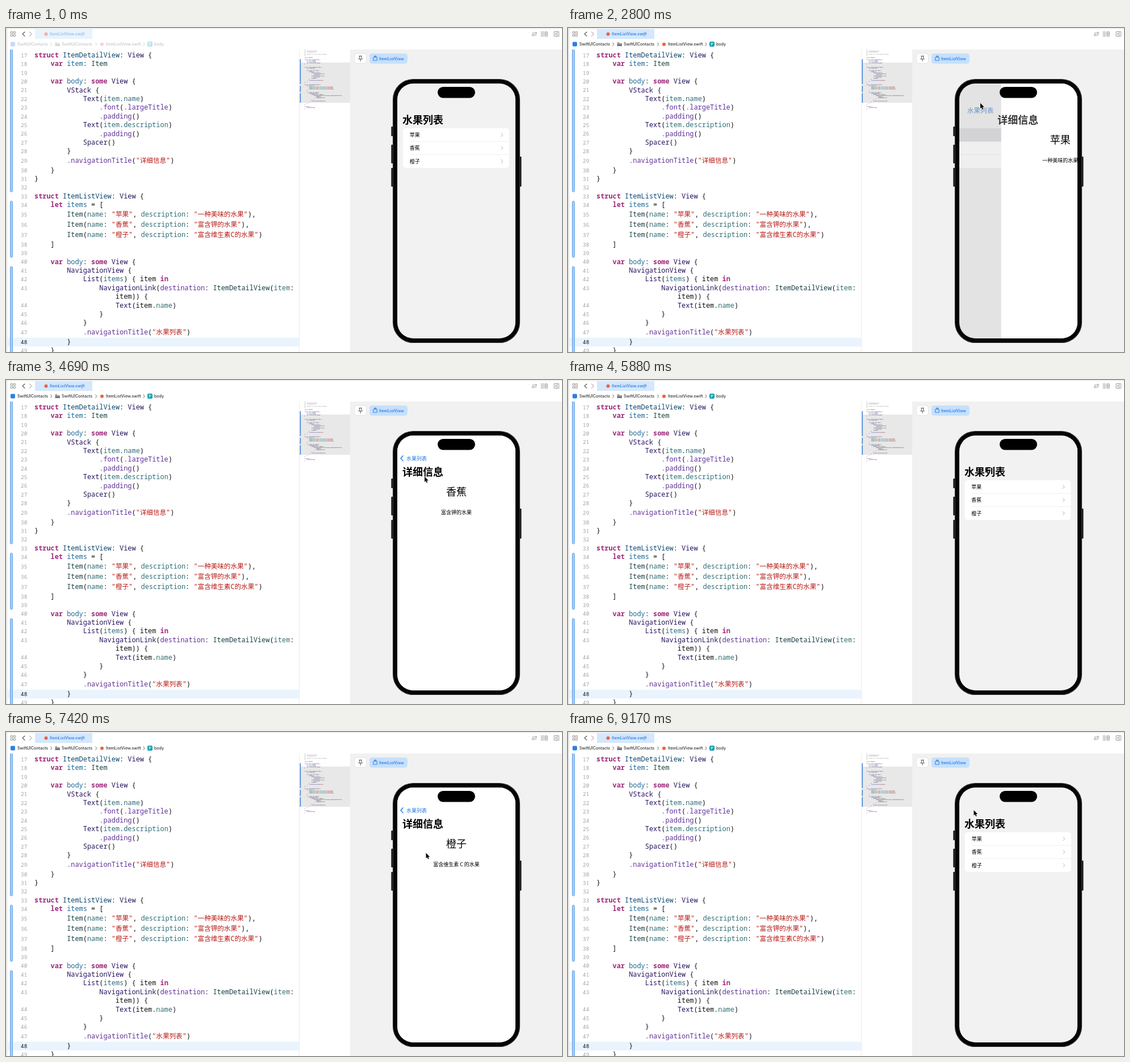
An HTML page for the animation above (9.24 s loop, 979 px wide and 572 px high).

```html
<!DOCTYPE html>
<html lang="zh-CN">
<head>
<meta charset="utf-8">
<style>
html, body { margin: 0; width: 100%; height: 100%; overflow: hidden; background: #fff; }
svg { display: block; }
text { white-space: pre; }
.ui { font-family: Inter, "Open Sans", sans-serif; font-weight: 500; }
.cn { font-family: "Noto Sans CJK SC", "Noto Sans CJK", sans-serif; }
.code { font: 500 11.92px "Noto Sans Mono", "DejaVu Sans Mono", monospace; }
.code .han { font: 500 11.57px "Noto Sans CJK SC", "Noto Sans CJK", sans-serif; }
.num { font: 400 9.4px "Noto Sans Mono", "DejaVu Sans Mono", monospace; text-anchor: end; }
.ln { fill: none; stroke-linecap: round; stroke-linejoin: round; }
</style>
</head>
<body>
<svg id="stage" width="979" height="572" viewBox="0 0 979 572">
  <defs><clipPath id="screen"><rect x="689" y="98" width="208" height="450" rx="28"/></clipPath></defs>
  <rect width="979" height="572" fill="#fff"/>
  <rect width="979" height="1.5" fill="#ececec"/>
  <rect width="2.2" height="572" fill="#e6e6e6"/>

  <g class="ln" stroke="#858585" stroke-width=".8">
    <path d="M8.5 6.5h3v3h-3zM13.5 6.5h3v3h-3zM8.5 11.5h3v3h-3zM13.5 11.5h3v3h-3z"/>
    <path d="M33 7l-4 3.7 4 3.7" stroke="#444" stroke-width="1.1"/>
    <path d="M41.5 7l4 3.7-4 3.7" stroke="#b0b0b0" stroke-width="1.1"/>
    <path d="M927 8.8h7.5m-2-2 2 2-2 2M934 12.4h-7.5m2-2-2 2 2 2"/>
    <path d="M942 7h5M942 9.4h5M942 11.8h5M942 14.2h5M949.5 6.8h3.6v7.6h-3.6zM949.5 9.3h3.6M949.5 11.8h3.6"/>
    <path d="M965.5 6.5h8v8h-8zM970.5 6.5v8M967 10.5h2M968 9.5v2"/>
  </g>

  <g id="tab">
    <rect x="51" y="2" width="101" height="17.3" fill="#d3e8fd"/>
    <circle cx="70.5" cy="10.8" r="3" fill="#f0603c"/>
    <text class="ui" x="77" y="13.3" font-size="7.1" font-style="italic" fill="#2478dc">ItemListView.swift</text>
  </g>
  <g id="crumbs" class="ui" font-size="7" fill="#303030">
    <rect x="8" y="24.5" width="8" height="8" rx="1.8" fill="#2f7fe6"/>
    <text x="20" y="31.2">SwiftUIContacts</text>
    <path d="M86.5 25.5h3l1 1.2h4.5v5.3h-8.5z" fill="#777"/>
    <path d="M86.5 27.7h8.5" stroke="#fff" stroke-width=".6"/>
    <text x="98" y="31.2">SwiftUIContacts</text>
    <circle cx="169" cy="28.8" r="3" fill="#f0603c"/>
    <text x="176" y="31.2" font-size="7.1">ItemListView.swift</text>
    <rect x="249" y="24" width="9" height="9" rx="2" fill="#1aa3b5"/>
    <text x="251.4" y="31" font-size="6.6" fill="#fff">P</text>
    <text x="261" y="31.2">body</text>
    <path class="ln" d="M78.7 26l2 2.7-2 2.7M157.7 26l2 2.7-2 2.7M242 26l2 2.7-2 2.7" stroke="#555" stroke-width=".9"/>
  </g>

  <rect x="2.2" y="546.8" width="514" height="15.4" fill="#e9f4fe"/>
  <g fill="#a3cbf6" stroke="#66a5e8">
    <path d="M7.5 38v249.5a2 2 0 0 0 4 0v-249.5"/>
    <rect x="7.5" y="305.5" width="4" height="99.5" rx="2"/>
    <path d="M7.5 572v-149a2 2 0 0 1 4 0v149"/>
  </g>
  <g id="code"></g>

  <path d="M516.5 38v534" stroke="#ececec"/>
  <rect x="518" y="61" width="88" height="71" fill="#e8e8e8"/>
  <g id="map"></g>
  <path d="M518.3 55v44M518.3 102v11M518.3 115v17" stroke="#3b7fd4" stroke-width="1.5"/>

  <rect x="606" y="38" width="373" height="534" fill="#f1f1f1"/>
  <rect x="613.5" y="45" width="21" height="17.5" rx="4" fill="#fff" stroke="#dedede" stroke-width=".8"/>
  <path class="ln" d="M621.8 49.5h4.6M622.5 49.5v3.3l-1.7 2h6.6l-1.7-2v-3.3M624.1 55v3.6" stroke="#444" stroke-width=".9"/>
  <rect x="640" y="45" width="67" height="18" rx="4.5" fill="#c6e0fc"/>
  <path class="ln" d="M647 52h6.4v5.2h-6.4zM648 50.5h4.4M649 49.2h2.4" stroke="#2478dc" stroke-width=".9"/>
  <text class="ui" x="657" y="56.6" font-size="7.1" fill="#2478dc">ItemListView</text>

  <g fill="#1a1a1a">
    <rect x="678.3" y="174" width="3.5" height="17" rx="1"/>
    <rect x="678.3" y="206" width="3.5" height="33" rx="1"/>
    <rect x="678.3" y="247" width="3.5" height="33" rx="1"/>
    <rect x="904" y="227" width="3.5" height="53" rx="1"/>
    <rect x="681.5" y="90.5" width="223" height="465" rx="36" fill="#050505" stroke="#343434" stroke-width="1.2"/>
  </g>

  <g clip-path="url(#screen)">
    <rect x="689" y="98" width="208" height="450" fill="#f2f2f2"/>
    <g id="list">
      <rect x="699" y="177" width="187" height="70" rx="5" fill="#fff"/>
      <g id="rows"></g>
    </g>
    <rect id="dim" x="689" y="98" width="208" height="450"/>
    <g id="detail">
      <rect x="689" y="98" width="208" height="450" fill="#fff"/>
      <g class="cn" text-anchor="middle">
        <text id="name" x="793" y="203.8" font-size="18"></text>
        <text id="desc" x="793" y="237" font-size="9"></text>
      </g>
    </g>
    <path id="back" class="ln" d="M699 133.7l-4 4.6 4 4.6" stroke="#1f76e4" stroke-width="1.4"/>
    <text id="blue" class="cn" fill="#1f76e4">水果列表</text>
    <text id="bold" class="cn" font-weight="700">水果列表</text>
    <text id="title" class="cn" y="168.8" font-size="18" font-weight="700">详细信息</text>
    <rect x="760" y="104" width="66" height="19.5" rx="9.75"/>
  </g>

  <path id="cursor" d="M0 0V9.6L2.2 7.6 3.6 10.9 5.2 10.2 3.8 7.1H6.8Z" stroke="#fff" stroke-width=".8" paint-order="stroke"/>
</svg>

<script>
const NS = 'http://www.w3.org/2000/svg';
const $ = id => document.getElementById(id);

function add(parent, tag, attrs, text) {
  const el = document.createElementNS(NS, tag);
  set(el, attrs);
  if (text !== undefined) el.textContent = text;
  parent.appendChild(el);
  return el;
}
function set(el, attrs) {
  for (const k in attrs) el.setAttribute(k, attrs[k]);
}

// Code: k keyword, d declared type, v declared name, c framework type,
// t project type, m member, p property, s string, r remark
const COLORS = { k: '#a02a7c', d: '#0c4870', c: '#29145e', v: '#1a6894', t: '#1a4147', m: '#60329a', p: '#326f77', s: '#b81a15', r: '#7d8790' };
const CODE = `k[struct] d[ItemDetailView]: c[View] {
    k[var] v[item]: t[Item]

    k[var] v[body]: k[some] c[View] {
        c[VStack] {
            c[Text](p[item].p[name])
                m[.font](m[.largeTitle])
                m[.padding]()
            c[Text](p[item].p[description])
                m[.padding]()
            c[Spacer]()
        }
        m[.navigationTitle](s["详细信息"])
    }
}

k[struct] d[ItemListView]: c[View] {
    k[let] v[items] = [
        t[Item](p[name]: s["苹果"], p[description]: s["一种美味的水果"]),
        t[Item](p[name]: s["香蕉"], p[description]: s["富含钾的水果"]),
        t[Item](p[name]: s["橙子"], p[description]: s["富含维生素C的水果"])
    ]

    k[var] v[body]: k[some] c[View] {
        c[NavigationView] {
            c[List](p[items]) { item k[in]
                c[NavigationLink](m[destination]: t[ItemDetailView](p[item]:
                    item)) {
                    c[Text](item.p[name])
                }
            }
            m[.navigationTitle](s["水果列表"])
        }
    }`.split('\n');
const HEAD = `r[//]
r[//  ItemListView.swift]
r[//  SwiftUIContacts]
r[//]
r[//  Created on a quiet sunny afternoon]
r[//]

k[import] c[SwiftUI]

k[struct] d[Item]: c[Identifiable] {
    k[let] v[id] = c[UUID]()
    k[let] v[name]: c[String]
    k[let] v[description]: c[String]
}

`.split('\n');
const TAIL = ['}', '', 'k[#Preview] {', '    t[ItemListView]()', '}'];

const isHan = s => /[\u4e00-\u9fff]/.test(s);

function tokens(line) {
  const out = [], re = /([kdvctmpsr])\[([^\]]*)\]/g;
  let at = 0, m;
  while ((m = re.exec(line))) {
    if (m.index > at) out.push([line.slice(at, m.index), '#111']);
    out.push([m[2], COLORS[m[1]], m[1]]);
    at = re.lastIndex;
  }
  if (at < line.length) out.push([line.slice(at), '#111']);
  return out;
}

function drawCode() {
  let top = 40.3, no = 17;
  for (const line of CODE) {
    const h = isHan(line) ? 18 : 15.4, mid = top + h / 2;
    const wrapped = /^ +item\)\)/.test(line);
    if (!wrapped) {
      add($('code'), 'text', { class: 'num', x: 37.3, y: mid + 3.7, fill: no === 48 ? '#111' : '#a3a3a3' }, no);
      no++;
    }
    const row = add($('code'), 'text', { class: 'code', x: 50, y: mid + 4 });
    for (const [str, fill, kind] of tokens(line))
      for (const part of str.match(/[\u4e00-\u9fff]+|[^\u4e00-\u9fff]+/g))
        add(row, 'tspan', { fill, class: isHan(part) ? 'han' : '', ...(kind === 'k' && { 'font-weight': 600 }) }, part);
    top += h;
  }
}

function drawMap() {
  [...HEAD, ...CODE, ...TAIL].forEach((line, i) => {
    let col = 0;
    for (const [str, fill] of tokens(line)) {
      for (const w of str.matchAll(/\S+/g))
        add($('map'), 'rect', { x: 525.5 + (col + w.index) * 1.03, y: 38.2 + i * 1.92, width: w[0].length * 1.03, height: 1.1, fill, opacity: .42 });
      col += str.length;
    }
  });
}

const FRUIT = [['苹果', '一种美味的水果'], ['香蕉', '富含钾的水果'], ['橙子', '富含维生素C的水果']];
const CARD = ['M699 200.4V182a5 5 0 0 1 5-5H881a5 5 0 0 1 5 5V200.4Z', 'M699 200.4H886V223.7H699Z', 'M699 223.7H886V242a5 5 0 0 1-5 5H704a5 5 0 0 1-5-5Z'];
const marks = FRUIT.map(([name], i) => {
  const y = 188.7 + i * 23.3, g = $('rows');
  const mark = add(g, 'path', { d: CARD[i], fill: '#d1d1d6', opacity: 0 });
  if (i) add(g, 'path', { d: `M711 ${y - 11.7}H886`, stroke: '#e4e4e4', 'stroke-width': .6 });
  add(g, 'text', { class: 'cn', x: 710.8, y: y + 3.4, 'font-size': 9 }, name);
  add(g, 'path', { class: 'ln', d: `M872 ${y - 2.8}l2.9 2.8-2.9 2.8`, stroke: '#b0b0b5', 'stroke-width': 1 });
  return mark;
});

function showFruit(i) {
  $('name').textContent = FRUIT[i][0];
  const [a, b] = FRUIT[i][1].split('C'), desc = $('desc');
  desc.textContent = a;
  if (b) {
    add(desc, 'tspan', { dx: 1.8 }, 'C');
    add(desc, 'tspan', { dx: 1.8 }, b);
  }
}

// Start of each push and pop
const VISITS = [[1122, 2722], [3990, 5460], [6580, 8185]];
// Pointer: time, x, y
const PATH = [
  [70, 742, 206], [560, 771.5, 188], [1600, 771.5, 188], [1960, 736, 147], [2170, 736, 147], [2380, 726, 132.5],
  [3200, 726, 132.5], [3710, 743, 208], [4480, 743, 208], [4690, 737, 170.5], [4970, 731, 143], [5180, 727, 138],
  [5250, 727, 138], [5390, 730, 138], [5600, 730, 138], [5880, 735, 154], [6300, 743, 230],
  [7280, 743, 230], [7420, 739.5, 213.5], [8120, 716, 139], [9100, 716, 139], [9170, 714.5, 138]
];
const LOOP = 9240, STEP = 70;

const clamp = v => Math.max(0, Math.min(1, v));
const mix = (a, b, p) => a + (b - a) * p;
const smooth = p => p * p * (3 - 2 * p);
function spring(ms) {
  const x = Math.max(0, ms) * .016;
  return 1 - (1 + x) * Math.exp(-x);
}

function pointer(t) {
  let i = 0;
  while (i < PATH.length - 2 && t >= PATH[i + 1][0]) i++;
  const [t0, x0, y0] = PATH[i], [t1, x1, y1] = PATH[i + 1];
  const p = smooth(clamp((t - t0) / (t1 - t0)));
  return [mix(x0, x1, p), mix(y0, y1, p)];
}

let shown = -1;
function render(t) {
  const focus = t < 910 ? 0 : t < 980 ? .5 : 1;
  set($('crumbs'), { opacity: mix(.28, 1, focus) });
  set($('tab'), { opacity: mix(.5, 1, focus) });

  let i = VISITS.length - 1;
  while (i > 0 && t < VISITS[i][0]) i--;
  const [push, pop] = VISITS[i], popping = t >= pop;
  const open = popping ? 1 - spring(t - pop) : spring(t - push);
  if (i !== shown) showFruit(shown = i);

  marks.forEach((m, k) => set(m, { opacity: k !== i || t < push ? 0 : popping ? open : 1 }));
  set($('list'), { transform: `translate(${-62 * open} 0)` });
  set($('dim'), { opacity: .1 * open });
  set($('detail'), { transform: `translate(${208 * (1 - open)} 0)` });

  // Back label and large title morph into each other
  const n = smooth(1 - open), size = mix(9, 18, n);
  const label = { x: mix(705, 698, n), y: mix(138.3, 162, n) + size * .378, 'font-size': size };
  set($('blue'), { ...label, opacity: (1 - n) ** 2 });
  set($('bold'), { ...label, opacity: n * n });
  set($('back'), { opacity: clamp(1 - 4 * n) });
  set($('title'), { x: 698 + 202 * n, opacity: 1 - .8 * n });

  const [x, y] = pointer(t);
  set($('cursor'), { transform: `translate(${x} ${y})`, visibility: t < PATH[0][0] ? 'hidden' : 'visible' });
}

drawCode();
drawMap();
const start = performance.now();
function tick() {
  const t = (performance.now() - start) % LOOP;
  render(Math.floor(t / STEP) * STEP);
  requestAnimationFrame(tick);
}
tick();
</script>
</body>
</html>
```
